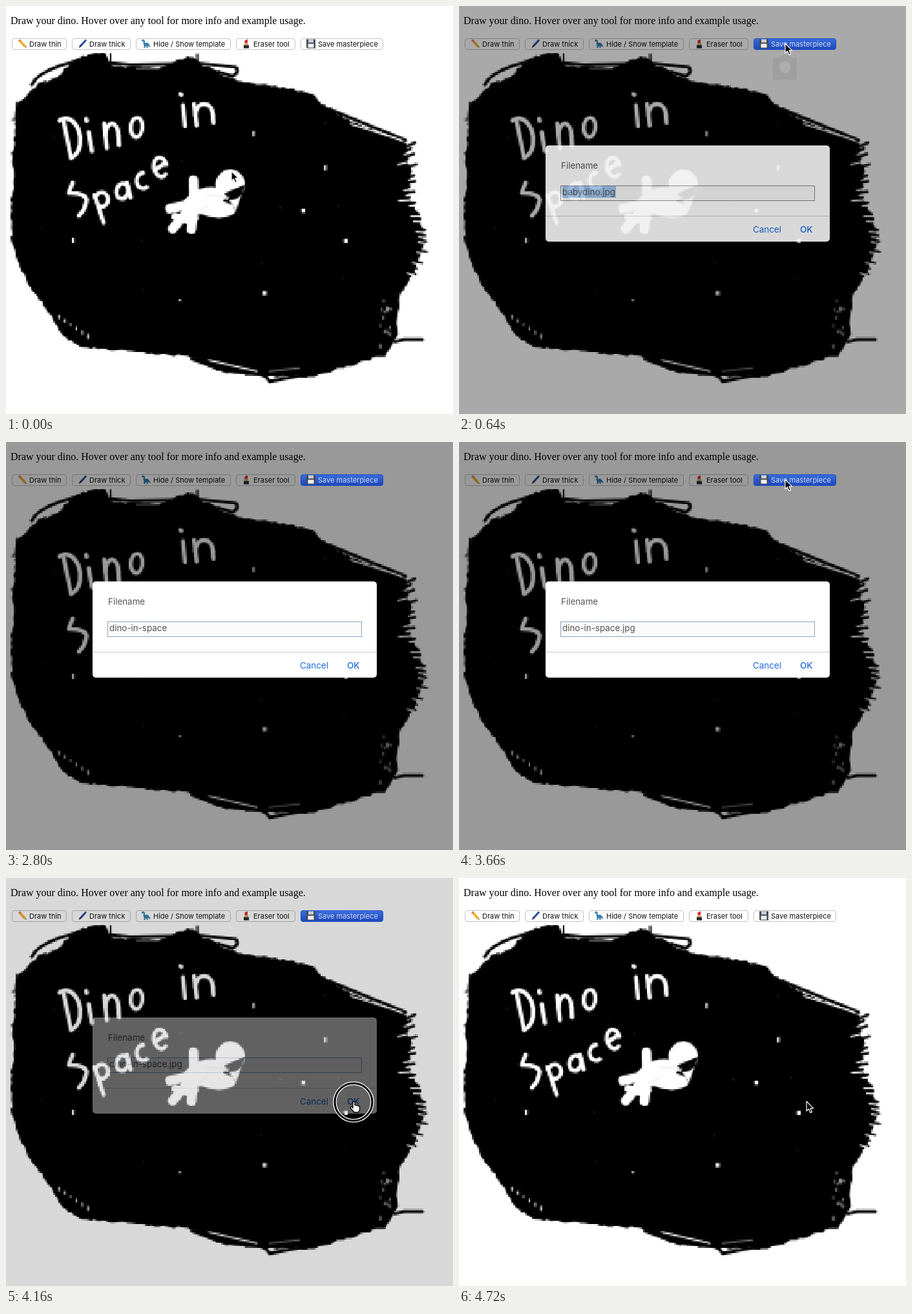
An HTML page with a canvas for the animation above (4.78 s loop, 692 by 632 pixels).

```html
<!DOCTYPE html>
<html lang="en">
<head>
<meta charset="utf-8">
<title>Draw your dino</title>
<style>
html, body { margin: 0; width: 100%; height: 100%; overflow: hidden; background: #fff; }
canvas, svg { position: absolute; left: 0; top: 0; }
canvas { image-rendering: pixelated; }
text { font-family: Inter, sans-serif; white-space: pre; }
.title { font: 16px "Liberation Serif", serif; }
.btn text { font-size: 11px; fill: #111; }
.btn .face { fill: #fff; stroke: #c3c3c3; }
#hot .face { fill: url(#blue); stroke: #2450bd; }
#hot text { fill: #d3dbf0; }
#dialog text { font-size: 13.4px; fill: #555; }
#dialog .link { fill: #1b6be0; }
</style>
</head>
<body>
<canvas id="art"></canvas>
<svg id="ui" width="692" height="632" viewBox="0 0 692 632">
  <defs>
    <linearGradient id="blue" x2="0" y2="1">
      <stop stop-color="#3a6ddd"/><stop offset="1" stop-color="#1c46bd"/>
    </linearGradient>
    <g id="pencil">
      <path d="M1 2 4 0 12 9l1.500 4L9 11.500z" fill="#efb02c"/>
      <path d="M1 2 4 0l1.500 2-3 2z" fill="#e87878"/>
      <path d="m11.500 12.200 2 .8-.4-2z" fill="#333"/>
    </g>
    <g id="pen">
      <path d="M12 0 14 2 6 11 3.500 9z" fill="#2b4c9c"/>
      <path d="m3.500 9 2.500 2-4.500 2.500z" fill="#23232b"/>
    </g>
    <g id="sauropod" fill="#367fa8">
      <path d="M0 2Q1-.5 4 .7 5.500 2 5 6q2-1.500 5 0 2 2 4 6-3-.5-4.500-2v3.500h-2V11H5.500v2.500h-2V9Q2 6 3 3L.5 3.500z"/>
    </g>
    <g id="lipstick">
      <path d="M4.500 6V2L9 0v6z" fill="#d9243c"/>
      <path d="M4 6h6v3H4z" fill="#d6b15c"/>
      <path d="M3 9h8v5H3z" fill="#292a31"/>
    </g>
    <g id="floppy">
      <path d="M0 0h14v14H1.500L0 12.500z" fill="#454b54"/>
      <path d="M3 0h8v5H3z" fill="#c8d0d8"/>
      <path d="M2.500 7h9v6h-9z" fill="#f1f1f1"/>
    </g>
  </defs>
  <text class="title" x="7" y="28">Draw your dino. Hover over any tool for more info and example usage.</text>
  <g id="bar"></g>
  <rect id="veil" width="692" height="632"/>
  <g id="hot"></g>
  <g id="ghost" opacity=".05">
    <path d="M486 80h10l3-4h11l3 4h10v34h-37z"/>
    <circle cx="504.500" cy="95" r="9" fill="#fff"/>
  </g>
  <g id="dialog">
    <rect x="134" y="216" width="440" height="149" rx="5" fill="#fff"/>
    <text x="158" y="252">Filename</text>
    <rect id="field" x="157.500" y="278.500" width="393" height="23" fill="#fafafa"/>
    <rect id="mark" x="160" y="279" width="83" height="18" fill="#9dc2ee"/>
    <text id="name" x="160" y="293"></text>
    <rect id="caret" y="279" width="1" height="17"/>
    <path d="M134 325.500h440" stroke="#ccc"/>
    <text class="link" x="455" y="351">Cancel</text>
    <text class="link" x="528" y="351" font-weight="500">OK</text>
  </g>
  <g id="ring" fill="none">
    <circle r="29" stroke="#fff" stroke-width="5.500"/>
    <circle r="29" stroke="#000" stroke-width="3"/>
  </g>
  <g id="cursor" stroke-linejoin="round">
    <path id="arrow" d="M0 0V15l3.400-3.200 2.500 5.800 2.600-1.100-2.500-5.600h4.700z" stroke="#fff" stroke-width="1.200"/>
    <path id="hand" d="M-1 1q1.500-1.500 3 0v5q2-1 2.700.6 2-.7 2.600.8 2.200-.4 2.300 1.600v4l-2 4H1L-4 11q-1.500-2-.2-2.700 1.200-.5 3.200 2z" fill="#fff" stroke="#000" stroke-width="1.300"/>
  </g>
</svg>
<script>
const LOOP = 4780;
const $ = id => document.getElementById(id);
const span = (t, start, length) => Math.min(1, Math.max(0, (t - start) / length));
const easeOut = p => 1 - (1 - p) ** 3;
const easeInOut = p => p * p * (3 - 2 * p);
const mix = (a, b, p) => a + (b - a) * p;
const set = (id, name, value) => $(id).setAttribute(name, value);
const show = (id, on) => set(id, 'visibility', on ? 'visible' : 'hidden');

// Toolbar
const button = (x, w, icon, label) => `<g class="btn" transform="translate(${x} 50)">
  <rect class="face" x=".5" y=".5" width="${w - 1}" height="17" rx="3.500"/>
  <use href="#${icon}" x="9" y="1.500"/><text x="27" y="13">${label}</text></g>`;
const save = button(456, 128, 'floppy', 'Save masterpiece');
$('bar').innerHTML = button(9, 85, 'pencil', 'Draw thin') +
  button(102, 91, 'pen', 'Draw thick') +
  button(201, 147, 'sauropod', 'Hide / Show template') +
  button(356, 92, 'lipstick', 'Eraser tool') + save;
$('hot').innerHTML = save;

// Coarse-pixel canvas, drawn in stage coordinates
const cell = 2.65, left = 7, top0 = 70;
const art = $('art'), c = art.getContext('2d');
art.width = 244;
art.height = 196;
Object.assign(art.style, {
  left: left + 'px', top: top0 + 'px', width: art.width * cell + 'px', height: art.height * cell + 'px'
});
c.scale(1 / cell, 1 / cell);
c.translate(-left, -top0);
c.lineCap = c.lineJoin = 'round';

let seed = 11;
const rand = (a = 0, b = 1) => mix(a, b, (seed = seed * 16807 % 2147483647) / 2147483647);

function ink(color, width, d) {
  c.strokeStyle = color;
  c.lineWidth = width;
  if (d) c.stroke(new Path2D(d));
}
function stem(x0, y0, x1, y1) {
  c.beginPath();
  c.moveTo(x0, y0);
  c.lineTo(x1, y1);
  c.stroke();
}
function bow(x, y, rx, ry, from = 0, to = 2, tilt = 0) {
  c.beginPath();
  c.ellipse(x, y, rx, ry, tilt, from * Math.PI, to * Math.PI);
  c.stroke();
}
function arch(x, y, w, h) {
  stem(x, y - h, x + 4, y);
  bow(x + w / 2 + 2, y - h / 2, w / 2, h / 2, 1, 2);
  stem(x + w + 2, y - h / 2, x + w + 3, y - 4);
}
function speck(x, y, w, h, color = '#fff') {
  c.fillStyle = color;
  c.fillRect(x - w / 2, y - h / 2, w, h);
}

// Black sky: a few corners joined by a shaky hand
function sky() {
  const rim = `36,138 52,121 82,110 108,84 138,73 152,76 164,94 235,97 285,79 300,90 332,106 358,118
    435,129 472,136 482,150 500,160 532,180 616,213 626,262 620,292 640,330 646,366 630,411 607,450
    603,515 584,541 470,573 400,573 330,565 285,542 160,531 115,526 85,506 66,472 35,430 18,395
    10,360 9,300 15,270 10,235 16,200 17,155`.split(/\s+/).map(p => p.split(',').map(Number));
  c.beginPath();
  rim.forEach(([x, y], i) => {
    const [nx, ny] = rim[(i + 1) % rim.length];
    const steps = Math.ceil(Math.hypot(nx - x, ny - y) / 6);
    for (let k = 0; k < steps; k++) {
      c.lineTo(mix(x, nx, k / steps) + rand(-2, 2), mix(y, ny, k / steps) + rand(-2, 2));
    }
  });
  c.closePath();
  c.fillStyle = '#000';
  c.fill();
  ink('#000', 3);
  c.stroke();

  // Loose strokes that leave the edge
  ink('#000', 5, `M40 122Q46 106 84 92L112 84M160 88L192 91 262 90M300 89L356 95Q362 104 350 109L328 102
    M500 160L560 184 618 208M602 520L616 517H644M288 547L340 566 400 572 408 582 440 576 500 566`);
  ink('#000', 3, 'M162 74V92M296 75V90M17 150V165M10 176H18');
  ink('#fff', 2.500, 'M48 117L82 100M62 117L86 104M328 97L350 101M534 183L612 208M314 549L388 566');
  ink('#888', 2, 'M202 97H236M408 566L454 561');

  // Fringe on the right
  for (let y = 218; y < 425; y += 8) {
    const reach = 624 + 20 * Math.exp(-(((y - 362) / 40) ** 2)) + rand(-6, 12);
    const slope = (y - 320) * .06;
    ink('#000', 4);
    stem(604, y - slope, reach, y + slope);
    if (rand() < .55) {
      ink('#fff', 2.500);
      stem(reach - rand(8, 18), y + 4, reach + 4, y + 4 + slope);
    }
  }
  // Missed spots near the lower corners
  for (let i = 0; i < 14; i++) speck(rand(578, 600), rand(455, 540), 2.65, rand(3, 7), '#777');
  for (let i = 0; i < 6; i++) speck(82 + i * 9, 482 + i * 6, 2.65, rand(3, 8), '#ddd');
  for (let i = 0; i < 12; i++) speck(rand(30, 560), rand(140, 500), 2.65, 2.65, '#222');
}

function lettering() {
  ink('#fff', 6.500);
  stem(89, 179, 101, 236);                     // Dino
  bow(94, 205, 21, 31, -.62, .42, -.12);
  stem(124, 175, 125, 178);
  stem(128, 196, 133, 225);
  arch(152, 220, 20, 38);
  bow(202, 188, 9, 15, 0, 2, .1);
  stem(270, 136, 271, 138);                    // in
  stem(274, 154, 277, 186);
  arch(291, 185, 27, 33);
  ink('#fff', 6.500, 'M103 274L97 290Q121 289 125 300 123 315 113 325');   // Space
  stem(137, 293, 151, 336);
  bow(148, 300, 10, 11, -.9, .6);
  bow(180, 287, 9, 12, 0, 2, .2);
  stem(187, 274, 193, 297);
  bow(212, 271, 10, 12, .3, 1.5);
  bow(239, 250, 10, 15, .3, 1.95, -.2);
  stem(230, 254, 246, 244);
}

function dino() {
  c.fillStyle = '#fff';
  c.beginPath();
  c.ellipse(347, 277, 23, 24, 0, 0, 7);
  c.ellipse(306, 302, 34, 19, -.35, 0, 7);
  c.ellipse(326, 315, 30, 13, .05, 0, 7);
  c.fill();
  ink('#fff', 15);
  for (const [x, y] of [[290, 270], [254, 314], [258, 345], [287, 346]]) stem(x, y, 291, 306);
  ink('#fff', 12, 'M262 326L280 332 292 328');
  ink('#e6e6e6', 1.500, 'M312 294L345 296M300 316L312 308');
}

function stars() {
  for (const [x, y] of [[383, 198], [494, 251], [104, 363], [590, 470]]) speck(x, y, 3, 8);
  for (const [x, y] of [[460, 317], [526, 364], [400, 445]]) speck(x, y, 6, 6);
  speck(269, 456, 3, 3);
}

sky();
lettering();
dino();
stars();

// Both clicks share one rhythm: travel, rest, press
const TRAVEL = 280, REST = 140, RING = 100;
const spots = { rest: [349, 256], save: [505, 58], ok: [538, 346] };
const moves = [{ at: 60, from: spots.rest, to: spots.save }, { at: 3660, from: spots.save, to: spots.ok }];
for (const m of moves) m.press = m.at + TRAVEL + REST;
const [opening, closing] = moves;
const TYPING = 1160, CLOSED = closing.press + RING, BLINK = 220;

// Bursts of typing: start, pace, text
const bursts = [[TYPING, 120, 'dino-'], [1800, 0, 'in'], [2020, 112, '-space'], [3140, 0, '.'], [3340, 50, 'jpg']];
const keys = bursts.flatMap(([at, pace, text]) => [...text].map((char, i) => ({ char, at: at + i * pace })));

function typeName(t) {
  const typed = keys.filter(k => k.at <= t);
  const last = typed[typed.length - 1];
  const open = t > opening.press && t < CLOSED;
  $('name').textContent = last ? typed.map(k => k.char).join('') : 'babydino.jpg';
  set('field', 'stroke', last ? '#8aa3c4' : '#858585');
  show('mark', open && !last);
  const lit = open && last && Math.floor((t - last.at) / BLINK) % 2 === 0;
  show('caret', lit);
  if (lit) set('caret', 'x', Math.round(160 + $('name').getComputedTextLength()));
}

function pointer(t) {
  const m = t < closing.at ? opening : closing;
  const p = easeInOut(span(t, m.at, TRAVEL));
  const [x, y] = m.from.map((v, i) => mix(v, m.to[i], p));
  const hand = m === closing && y > 334 && t < CLOSED;
  show('cursor', t < TYPING || t >= closing.at);
  set('cursor', 'transform', `translate(${x} ${y})`);
  $('arrow').style.display = hand ? 'none' : '';
  $('hand').style.display = hand ? '' : 'none';

  const age = t - m.press;
  show('ring', age >= 0 && age < RING);
  set('ring', 'transform', `translate(${m.to[0]} ${m.to[1] + 1})`);
}

function render(t) {
  const level = easeOut(span(t, opening.press + 40, 260)) * (1 - span(t, CLOSED - 50, 50));
  set('veil', 'opacity', .4 * level);
  set('dialog', 'opacity', level);
  show('hot', t >= opening.press && t < CLOSED);
  show('ghost', level > .5 && level < .97 && t < TYPING);
  typeName(t);
  pointer(t);
}

const begin = performance.now();
function tick() {
  render((performance.now() - begin) % LOOP);
  requestAnimationFrame(tick);
}
tick();
</script>
</body>
</html>
```
